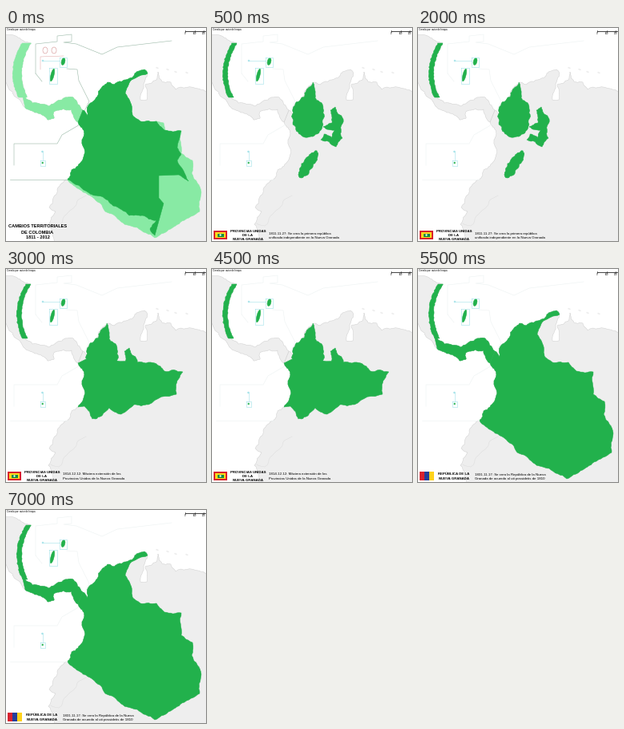
A matplotlib script that plays this animation: 250x267 px, repeating every 8 s.

```python
import math
import random

import matplotlib
import matplotlib.pyplot as plt
from matplotlib.animation import FuncAnimation
from matplotlib.patches import Ellipse, Polygon, Rectangle

W, H, DPI = 250, 267, 100
PX = 72 / DPI
GREEN, LIGHT, LAND = "#22b14c", "#88eaa4", "#eeeeee"
COAST, CYAN, SEA_LINE = "#d0d0d0", "#a6e3ea", "#9fbcab"
matplotlib.rcParams["font.family"] = "Liberation Sans"
rng = random.Random(7)

fig = plt.figure(figsize=(W / DPI, H / DPI), dpi=DPI, facecolor="white")
ax = fig.add_axes([0, 0, 1, 1])
ax.set_xlim(0, W)
ax.set_ylim(H, 0)
ax.axis("off")


def rough(points, amp=0.14, depth=3):
    """Turn a few key points into a ragged line by midpoint displacement."""
    for _ in range(depth):
        finer = [points[0]]
        for (x0, y0), (x1, y1) in zip(points, points[1:]):
            k = rng.uniform(-amp, amp)
            finer += [((x0 + x1) / 2 - k * (y1 - y0),
                       (y0 + y1) / 2 + k * (x1 - x0)), (x1, y1)]
        points = finer
    return points


def blob(cx, cy, rx, ry, tilt=0.0):
    """Ragged ellipse."""
    ring = []
    for i in range(17):
        a = math.tau * i / 16
        x, y = rx * math.cos(a), ry * math.sin(a)
        ring.append((cx + x * math.cos(tilt) - y * math.sin(tilt),
                     cy + x * math.sin(tilt) + y * math.cos(tilt)))
    return rough(ring, 0.2, 2)


def shore(y):
    """Bow of the Mosquito Coast."""
    return 19.5 + 0.008 * (y - 57) ** 2


def strip(width):
    ys = range(19, 88, 2)
    sea = [(shore(y) + rng.uniform(-0.6, 0.6), y) for y in ys]
    inland = [(shore(y) - width + rng.uniform(-0.6, 0.6), y) for y in ys]
    return sea + inland[::-1]


# Lines shared by several areas
caribbean = rough([(96, 103), (102, 110), (103, 97), (114, 86), (120, 74),
                   (127, 68), (135, 71), (145, 67), (158, 62), (166, 54),
                   (173, 52), (177, 57)])
pacific = rough([(90, 118), (97, 128), (95, 140), (98, 158), (90, 173),
                 (82, 178), (77, 190)])
isthmus_n = rough([(20, 82), (33, 94), (53, 98), (70, 90), (84, 87), (96, 103)])
isthmus_s = rough([(24, 100), (36, 106), (52, 115), (60, 113), (60, 105),
                   (72, 101), (82, 102), (90, 118)])
border_ne = rough([(177, 57), (157, 65), (149, 82), (155, 92), (158, 109),
                   (168, 117), (188, 117), (198, 128), (219, 129)], 0.08)
border_e = rough([(219, 129), (214, 150), (219, 158), (214, 166), (228, 192),
                  (216, 184)], 0.08) + [
    (191, 185), (191, 213), (197, 220), (186, 260)]
border_s = rough([(186, 260), (180, 252), (188, 241), (170, 235), (154, 235),
                  (134, 223), (119, 211), (104, 207), (77, 190)], 0.1)
claim_e = rough([(219, 129), (219, 157), (233, 166), (232, 182), (239, 194),
                 (244, 206), (242, 230), (220, 242), (203, 253), (186, 263)], 0.1)
claim_s = rough([(186, 263), (164, 250), (144, 243), (124, 230), (108, 212),
                 (93, 203), (77, 190)], 0.1)
venezuela = rough([(177, 57), (172, 70), (168, 90), (176, 90), (174, 71),
                   (188, 65), (190, 55), (195, 67), (206, 68), (212, 77),
                   (240, 76), (252, 82)])
ecuador = rough([(77, 190), (64, 202), (54, 225), (62, 230), (53, 246),
                 (60, 270)])

colombia = caribbean + border_ne + border_e + border_s + pacific[::-1]
claimed = caribbean + border_ne + claim_e + claim_s + pacific[::-1]
panama = isthmus_n + isthmus_s[::-1]
antioquia = blob(120, 111, 20.5, 26)
cartagena = rough([(126, 68), (129, 92), (110, 92), (118, 78), (126, 68)])
pamplona = rough([(148, 103), (154, 99), (158, 108), (164, 114), (161, 126),
                  (163, 138), (155, 149), (136, 140), (140, 133), (150, 138),
                  (153, 128), (139, 124), (150, 119), (148, 103)])
neiva = blob(120.5, 171, 20, 6.5, math.radians(-57))
plains = pacific[:33] + rough([(98, 172), (108, 188), (129, 174), (144, 182),
                               (160, 170), (178, 170), (213, 157), (214, 140),
                               (221, 129), (198, 128), (186, 118), (164, 117),
                               (157, 113), (100, 113)], 0.1)


def area(points, color, z=3, edge=None):
    return ax.add_patch(Polygon(points, facecolor=color, edgecolor=edge or color,
                                linewidth=0.5 * PX, zorder=z))


def line(points, color, lw=0.6, z=4, **style):
    return ax.plot(*zip(*points), color=color, lw=lw * PX, zorder=z, **style)[0]


def box(x, y, w, h, color, z=6):
    return ax.add_patch(Rectangle((x, y), w, h, facecolor=color, lw=0, zorder=z))


def frame(x, y, w, h):
    return line([(x, y), (x + w, y), (x + w, y + h), (x, y + h), (x, y)], CYAN)


def oval(x, y, w, h, color, angle=0, fill=True, z=4):
    return ax.add_patch(Ellipse((x, y), w, h, angle=angle, edgecolor=color,
                                facecolor=color if fill else "none",
                                lw=0.5 * PX, zorder=z))


def text(x, y, s, size, ha="left", **style):
    return ax.text(x, y, s, fontsize=size * PX, ha=ha, va="center",
                   color="black", zorder=8, **style)


def title(x, y, step, size, lines):
    return [text(x, y + i * step, s, size, "center", weight="bold")
            for i, s in enumerate(lines)]


def caption(first, second):
    return [text(71, 257.5, first, 4.4), text(71, 263.3, second, 4.4)]


def union_flag():
    return [box(2, 254, 17, 11, "#d8202c"), box(4, 256, 13, 7, "#ffd91a"),
            box(6.5, 257.5, 8, 4, "#128a43"),
            oval(10.5, 259.5, 1.7, 1.7, "white", z=7)]


def republic_flag():
    return [box(2 + 6 * i, 254, 6, 11, c)
            for i, c in enumerate(("#d8232f", "#233f9b", "#ffd21c"))]


def draw_base():
    area(caribbean + venezuela + [(252, 270)] + ecuador[::-1] + pacific[::-1],
         LAND, 1, COAST)
    area(isthmus_n + isthmus_s[::-1]
         + rough([(24, 100), (18, 91), (8, 80), (-2, 62)])
         + rough([(-2, 9), (14, 11), (28, 18)])
         + [(shore(y), y) for y in range(19, 83, 3)], LAND, 1, COAST)
    for x, y in ((189, 50), (202, 52), (212, 55), (226, 56)):
        oval(x, y, 3, 1.5, LAND, 25)
    line(rough([(56, 245), (66, 248), (84, 226), (100, 210)]), "#dddddd", 0.5, 2)

    # Islands and their insets
    oval(58, 59, 4, 16, GREEN, 14)
    oval(71.5, 42, 4.5, 9, GREEN, 14)
    frame(54, 50, 9.5, 19.5)
    frame(67, 36.5, 9, 12)
    line([(46, 41), (67, 41)], CYAN)
    oval(46, 41, 2, 2, CYAN)
    frame(42.5, 166, 6.5, 6.5)
    line([(45.5, 155), (45.5, 166)], CYAN)
    oval(45.5, 155, 2, 2, CYAN)
    oval(45.7, 169, 1.6, 2, GREEN, z=5)

    text(1, 2.2, "Creado por: autor del mapa", 2.9)
    line([(224, 4), (249, 4)], "#333333", 0.9)
    for x, s in ((224, "0"), (236, "100"), (247, "200")):
        line([(x, 2.5), (x, 5)], "#333333", 0.7)
        text(x, 7.5, s, 2.6, "center")


def sea_limits(color):
    paths = ([(37, 57), (37, 20), (64, 17), (64, 10), (82, 8), (82, 17),
              (72, 18), (88, 20), (120, 33), (139, 24), (207, 16)],
             [(37, 57), (45, 67)],
             [(76, 51), (89, 52), (91, 66), (104, 92), (98, 104)],
             [(10, 172), (10, 145), (64, 145), (70, 134), (94, 120)],
             [(5, 190), (77, 190)])
    return [line(p, color, 0.6, 2) for p in paths]


def scene_changes():
    reds = [oval(x, 28, 6, 8, "#cf8585", fill=False) for x in (49, 60)]
    reds.append(line([(43, 52), (43, 36), (72, 35)], "#e0a5a5", 0.5))
    return ([area(p, LIGHT) for p in (strip(11), panama, claimed)]
            + [area([(188, 117), (197, 119), (199, 128)], LIGHT),
               area(colombia, GREEN, 4)]
            + reds + sea_limits(SEA_LINE)
            + title(39.5, 249, 7, 5.6, ("CAMBIOS TERRITORIALES", "DE COLOMBIA",
                                        "1811 - 2012")))


def union_scene(extra, first, second):
    shapes = [antioquia, cartagena, pamplona, neiva, strip(6)] + extra
    return ([area(p, GREEN) for p in shapes] + sea_limits("#eef3f3")
            + union_flag()
            + title(45, 254.5, 5.3, 4.4, ("PROVINCIAS UNIDAS", "DE LA",
                                          "NUEVA GRANADA"))
            + caption(first, second))


def scene_republic():
    return ([area(p, GREEN) for p in (strip(6), panama, claimed)]
            + sea_limits("#eef3f3") + republic_flag()
            + title(44.5, 257.3, 6, 4.4, ("REPÚBLICA DE LA", "NUEVA GRANADA"))
            + caption("1831.11.17: Se crea la República de la Nueva",
                      "Granada de acuerdo al uti possidetis de 1810"))


draw_base()
scenes = [
    scene_changes(),
    union_scene([], "1811.11.27: Se crea la primera república",
                "unificada independiente en la Nueva Granada"),
    union_scene([plains], "1814.12.12: Máxima extensión de las",
                "Provincias Unidas de la Nueva Granada"),
    scene_republic(),
]


def update(n):
    current = (n + 4) // 5
    for i, parts in enumerate(scenes):
        for part in parts:
            part.set_visible(i == current)
    return []


anim = FuncAnimation(fig, update, frames=16, interval=500, repeat=True,
                     repeat_delay=0, blit=False)
plt.show()
```
